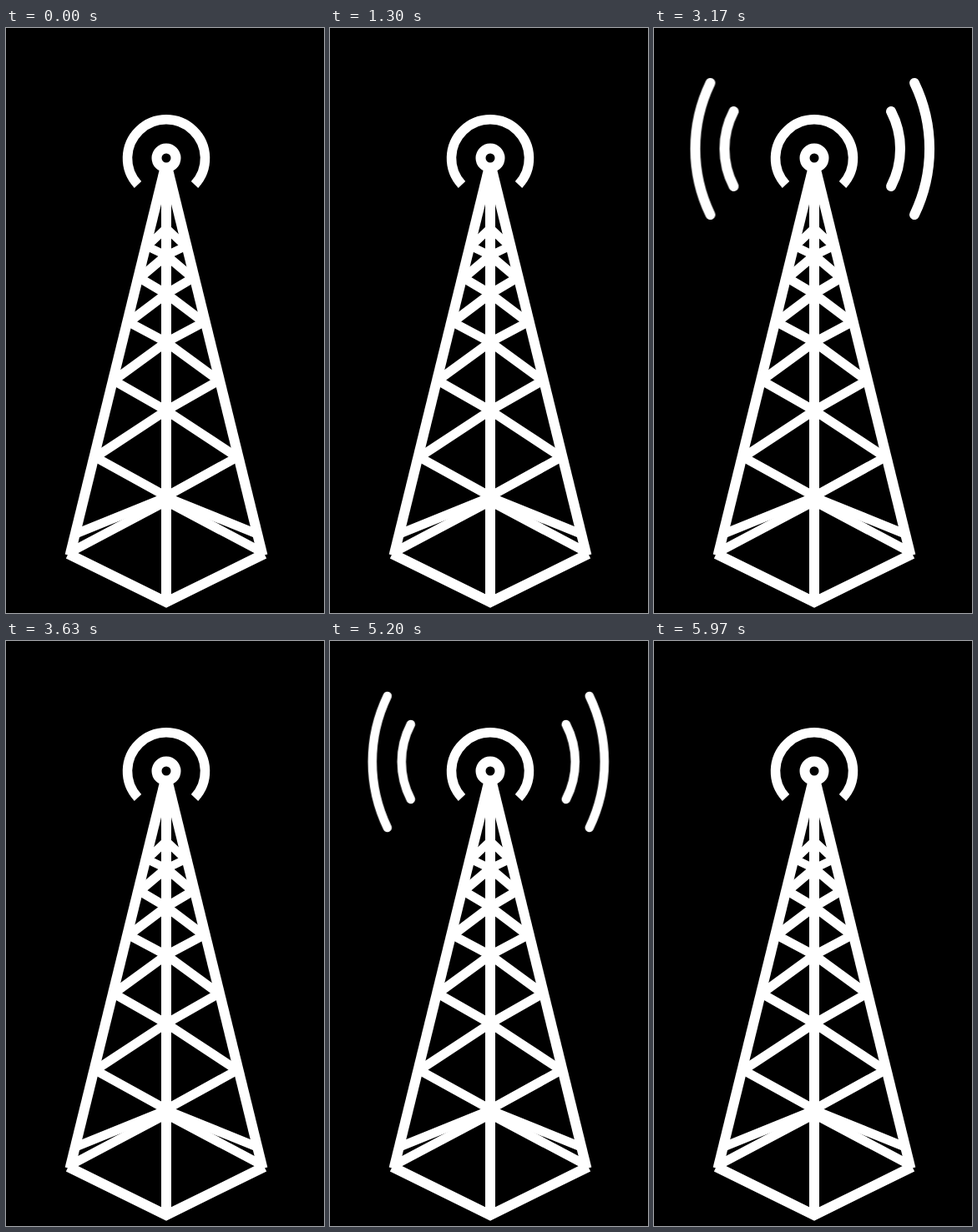
Recreate the animation shown at these times as an HTML page. Size 381 by 702 pixels, loop 6960 ms.

```html
<!DOCTYPE html>
<html lang="en">
<head>
<meta charset="utf-8">
<title>Radio tower</title>
<style>
  html, body { margin: 0; width: 100%; height: 100%; overflow: hidden; background: #000; }
  svg { display: block; width: 100%; height: 100%; fill: none; stroke: #fff; }

  .wave {
    stroke-linecap: round;
    stroke-width: 0;
    animation: pulse 6960ms infinite;
  }
  .outer { animation: pulse 6960ms infinite, late 6960ms infinite step-end; }

  /* Each band thickens outwards from its inner edge, then thins towards its outer edge. */
  @keyframes pulse {
    0%, 18.675%, 52.152%, 85.773%, 100% {
      stroke-width: 0px; transform: translateX(-6.5px);
      animation-timing-function: step-end;
    }
    1.866%, 35.487%, 68.964% {
      stroke-width: 3px; transform: translateX(4.5px);
      animation-timing-function: cubic-bezier(.333, .667, .667, 1);
    }
    11.494%, 45.115%, 78.592% {
      stroke-width: 12px; transform: translateX(0);
      animation-timing-function: linear;
    }
    11.782%, 45.402%, 78.879% {
      stroke-width: 12px; transform: translateX(-.5px);
      animation-timing-function: cubic-bezier(.333, 0, .667, .333);
    }
  }

  /* The outer band joins one step after the inner one. */
  @keyframes late {
    0%, 1.866%, 35.487%, 68.964% { opacity: 0; }
    2.297%, 35.918%, 69.395% { opacity: 1; }
  }
</style>
</head>
<body>
<svg viewBox="0 0 381 702">
  <defs>
    <g id="side" stroke-linejoin="bevel">
      <path stroke-width="12" d="M190 170L76.5 633"/>
      <path stroke-width="11" d="M192 562L107 515L192 459L129 423L192 377L147 353L192 319L160 300L192 273"/>
      <path stroke-width="10" d="M192 273L169 262L192 240"/>
      <path stroke-width="11" d="M86 606L192 563"/>
      <path stroke-width="11" d="M77 629L192 568"/>
    </g>
  </defs>

  <use href="#side"/>
  <use href="#side" transform="translate(384 0) scale(-1 1)"/>
  <path stroke-width="12" d="M192 170V689"/>
  <path stroke-width="12" d="M74.5 631L192 689L309.5 631"/>

  <circle cx="192" cy="156" r="11.5" stroke-width="12"/>
  <path stroke-width="11.5" d="M158 188A46.5 46.5 0 1 1 226 188"/>

  <g>
    <path class="wave" d="M96 100A97.5 97.5 0 0 0 96 190"/>
    <path class="wave outer" d="M68 66A182 182 0 0 0 68 224"/>
  </g>
  <g transform="translate(379.5 0) scale(-1 1)">
    <path class="wave" d="M96 100A97.5 97.5 0 0 0 96 190"/>
    <path class="wave outer" d="M68 66A182 182 0 0 0 68 224"/>
  </g>
</svg>
</body>
</html>
```
